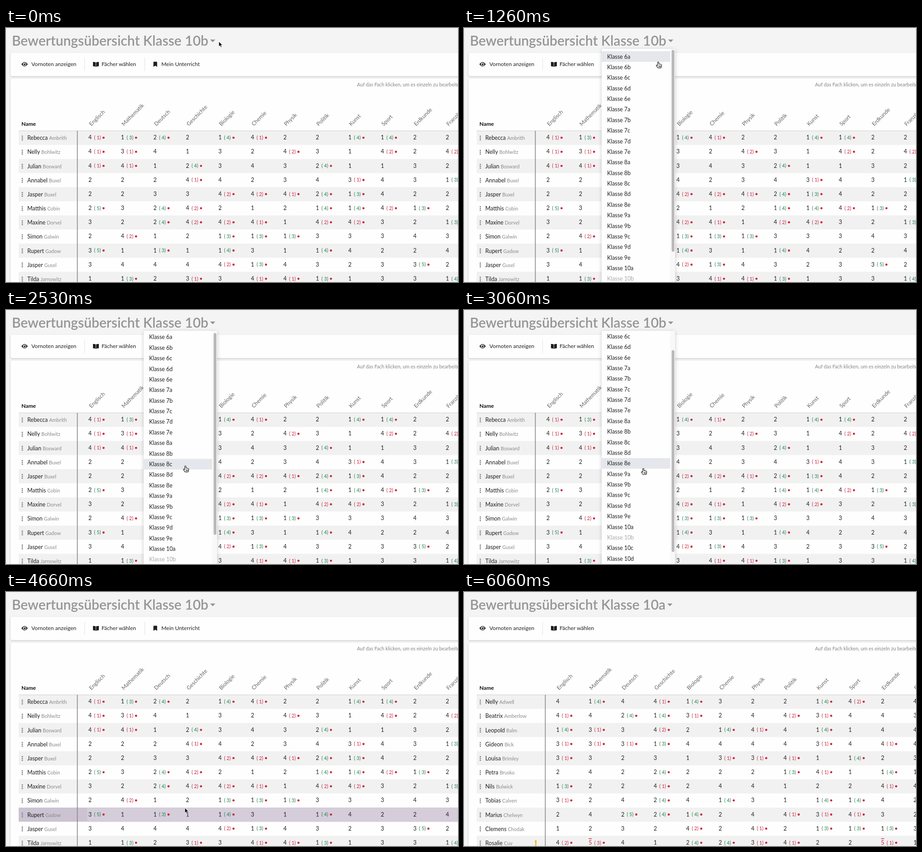
Write an HTML page that moves like this. It is 998 by 561 pixels and loops after 6.13 s.

```html
<!DOCTYPE html>
<html lang="de">
<head>
<meta charset="utf-8">
<title>Bewertungsübersicht</title>
<style>
  html, body { margin: 0; width: 100%; height: 100%; overflow: hidden; background: #f4f4f4; }
  svg { display: block; width: 998px; height: 561px; font: 12.4px Lato, "Open Sans", sans-serif; fill: #1f1f1f; cursor: default; }
  text { white-space: pre; }
  .card { fill: #fefefe; filter: drop-shadow(0 1px 1.5px rgba(0, 0, 0, .22)); }
  .title { font-size: 30px; font-weight: 600; fill: #959595; }
  .tool { font-size: 12.1px; }
  .sep { fill: #e2e2e2; }
  .hint { font-size: 10.8px; fill: #858585; }
  .bold { font-size: 12.2px; font-weight: 700; fill: #111; }
  .subject { font-size: 12.1px; fill: #666; }
  .stripe { fill: #f1f1f1; }
  .rule { fill: #cfcfcf; }
  .divider { fill: #868686; }
  .grip { fill: #858585; }
  .last { font-size: 10.9px; fill: #8a8a8a; }
  .prior { font-size: 10.8px; }
  .up { fill: #1b7d4a; }
  .down { fill: #c5213b; }
  .dot { fill: #d0243f; }
  .warn { fill: #f2b01e; }
  .hover { fill: #cbc3d1; }
  .hover-cells { fill: #d5cdda; }
  .panel { fill: #fefefe; filter: drop-shadow(0 2px 4px rgba(0, 0, 0, .2)); }
  .active { fill: #e5e7ec; }
  .off { fill: #a9a9a9; }
  .track { fill: #f8f8f9; }
  .thumb { fill: #bab7b8; }
</style>
</head>
<body>
<svg id="stage" viewBox="0 0 998 561">
  <defs>
    <clipPath id="listClip"><rect x="304" y="46" width="162" height="530" rx="3"/></clipPath>
  </defs>
  <text id="title" class="title" x="13" y="38.5"></text>
  <path id="caret" fill="#8f8f8f" d="M0 25.5H11.5L5.75 31.3Z"/>

  <rect class="card" x="10" y="54.5" width="1000" height="52" rx="4"/>
  <path d="M34 80Q41 70.5 48 80Q41 89.5 34 80Z"/>
  <circle cx="41" cy="80" r="3.5" fill="#fefefe"/>
  <circle cx="41" cy="80" r="2.3"/>
  <circle cx="40" cy="79" r=".9" fill="#fefefe"/>
  <text class="tool" x="56" y="84.3">Vornoten anzeigen</text>
  <rect class="sep" x="173" y="66" width="1" height="29"/>
  <path d="M192 75Q196 74.6 198.1 76V86Q196 84.6 192 84.6ZM205 75Q201 74.6 198.9 76V86Q201 84.6 205 84.6Z"/>
  <text class="tool" x="211" y="84.3">Fächer wählen</text>
  <g id="lessons">
    <rect class="sep" x="306" y="66" width="1" height="29"/>
    <path d="M325.5 75.5Q325.5 74.4 326.6 74.4H332.6Q333.7 74.4 333.7 75.5V85.8L329.6 83.2L325.5 85.8Z"/>
    <text class="tool" x="343" y="84.3">Mein Unterricht</text>
  </g>

  <rect class="card" x="10" y="112" width="1000" height="470" rx="4"/>
  <text class="hint" x="775" y="129">Auf das Fach klicken, um es einzeln zu bearbeiten</text>
  <text class="bold" x="34" y="216.3">Name</text>
  <g id="tables"></g>

  <g id="menu">
    <rect class="panel" x="304" y="46" width="162" height="530" rx="3"/>
    <g clip-path="url(#listClip)">
      <g id="list"><rect id="active" class="active" x="304" width="151" height="23.4"/></g>
      <rect class="track" x="455" y="46" width="11" height="530"/>
      <rect id="thumb" class="thumb" x="458.5" y="48.5" width="6" height="445.5" rx="3"/>
    </g>
  </g>

  <g id="cursor">
    <path id="arrow" fill="#000" stroke="#fff" stroke-width=".8" d="M0 0V11L2.6 8.6L4.4 12.6L6.3 11.8L4.5 7.9H8Z"/>
    <path id="hand" fill="#fff" stroke="#111" stroke-width="1.1" stroke-linejoin="round"
      d="M-1.3 1.2Q0-.8 1.3 1.2V5.2Q2.6 4.2 3.7 5.5Q5 4.8 5.9 6Q7.4 5.8 7.4 7.5V10Q7 12 6 13.6H-.8Q-2.5 11-4.4 8.6Q-4.4 6.8-2.7 7.4L-1.3 8.6ZM1.6 8.5V11.5M3.4 8.5V11.5M5.2 8.5V11.5"/>
  </g>
</svg>
<script>
const LOOP = 6130, OPEN = 662, CLOSE = 4300, SWAP = 4934;
const ROW_TOP = 227, ROW_H = 31.15, COL_W = 71.73;
const ITEM_TOP = 51.3, ITEM_H = 23.38;
const subjects = 'Englisch Mathematik Deutsch Geschichte Biologie Chemie Physik Politik Kunst Sport Erdkunde Französisch'.split(' ');

// Each row: first name, last name, then grades; a second digit is the prior grade.
const classB = `Rebecca Ambrith 41 13 24 2 14 41 2 2 14 14 2 2
Nelly Bohlwitz 41 31 4 1 3 2 42 3 1 42 2 42
Julian Bosward 41 41 1 24 3 4 3 24 1 1 3 2
Annabel Buxel 2 2 2 41 4 2 3 4 31 4 3 13
Jasper Buxel 2 2 3 3 42 42 41 24 13 4 2 2
Matthis Cobin 25 3 24 42 2 1 2 14 14 42 13 2
Maxine Dorvel 3 2 24 42 42 41 1 42 42 3 2 13
Simon Galwin 2 42 1 2 13 13 13 3 3 3 4 3
Rupert Gadow 35 1 13 1 14 3 1 14 4 2 2 4
Jasper Gusel 3 4 4 4 42 13 4 3 2 3 35 2
Tilda Jarnowitz 1 13 2 31 3 41 41 13 1 3 3 14`;
const classA = `Nelly Adwell 4 14 4 41 14 3 2 2 14 42 2 41
Beatrix Amberlow 41 4 24 14 31 2 4 42 31 4 4 31
Leopold Balm 14 31 3 42 2 14 41 4 14 1 4 42
Gideon Bick 31 31 31 13 4 4 4 4 31 4 41 41
Louisa Brimley 31 3 2 3 1 31 31 41 1 14 2 3
Petra Brusko 2 4 2 24 2 2 2 13 41 1 14 14
Nils Bulwick 13 2 2 41 2 4 4 1 2 2 41 4
Tobias Calven 31 2 4 24 4 14 3 1 14 14 4 2
Marius Chelwyn 2 4 25 24 14 2 4 41 31 41 3 24
Clemens Chodak 1 2 3 2 42 2 41 2 13 13 13 31
Rosalie Cuv 42 53 4 1 24 24 31 41 2 2 51 1`;

const $ = id => document.getElementById(id);

function add(parent, tag, attrs = {}, text) {
  const node = document.createElementNS('http://www.w3.org/2000/svg', tag);
  for (const key in attrs) node.setAttribute(key, attrs[key]);
  if (text !== undefined) node.textContent = text;
  parent.append(node);
  return node;
}
const rect = (parent, cls, x, y, width, height) =>
  add(parent, 'rect', { class: cls, x, y, width, height });
const label = (parent, cls, x, y, text) => add(parent, 'text', { class: cls, x, y }, text);
const dot = (parent, cls, cx, cy, r) => add(parent, 'circle', { class: cls, cx, cy, r });
const show = (node, on) => node.setAttribute('visibility', on ? 'inherit' : 'hidden');

function addGrade(parent, x, mid, code) {
  const [grade, prior] = code;
  const failing = grade === '5';
  label(parent, failing ? 'down' : '', x, mid + 4.3, grade);
  if (failing) rect(parent, 'down', x, mid - 9.5, 7, 1.3);
  if (!prior) return;
  label(parent, 'prior ' + (prior > grade ? 'up' : 'down'), x + 12.5, mid + 4, `( ${prior})`);
  dot(parent, 'dot', x + 33.4, mid + .3, 2.4);
}

function addTable(id, data, divider, x0) {
  const root = add($('tables'), 'g');
  const rows = data.split('\n').map(line => line.split(' '));
  const clip = add(root, 'clipPath', { id });
  rect(clip, '', divider, 112, 998, 449);

  rows.forEach((_, i) => {
    if (i % 2 === 0) rect(root, 'stripe', 28, ROW_TOP + i * ROW_H, 970, ROW_H);
  });
  const hover = rect(root, 'hover', 28, 0, 970, ROW_H);
  const cells = add(add(root, 'g', { 'clip-path': `url(#${id})` }), 'g');
  const hoverCells = rect(cells, 'hover-cells', x0 - 2.5, 0, 998, ROW_H);

  subjects.forEach((name, c) => {
    const x = x0 + c * COL_W + 6.5;
    add(cells, 'text', { class: 'subject', transform: `translate(${x} 217) rotate(-45)` }, name);
  });
  rows.forEach(([first, last, ...grades], i) => {
    const mid = 242 + i * ROW_H;
    for (const dy of [-4, 0, 4]) dot(root, 'grip', 36, mid + 1 + dy, 1.5);
    const name = label(root, '', 47, mid + 5.3, first);
    add(name, 'tspan', { class: 'last', dx: 3 }, last);
    grades.forEach((code, c) => addGrade(cells, x0 + c * COL_W, mid, code));
    if (grades.some(code => code[0] === '5')) {
      add(root, 'path', { class: 'warn', d: `M156.6 ${mid - 5}h3.8l-.7 8h-2.4z` });
      dot(root, 'warn', 158.5, mid + 5.6, 1.8);
    }
  });
  rect(root, 'rule', 28, 226.6, 970, 1);
  rect(root, 'divider', divider - .8, 227, 1.6, 340);
  return { root, cells, hover, hoverCells };
}

const tableB = addTable('cellsB', classB, 157.5, 182);
const tableA = addTable('cellsA', classA, 179.5, 203.5);

for (let i = 0; i < 25; i++) {
  const name = 6 + Math.floor(i / 5) + 'abcde'[i % 5];
  label($('list'), name === '10b' ? 'off' : '', 316, ITEM_TOP + i * ITEM_H + 16.2, 'Klasse ' + name);
}

const clamp = v => Math.min(1, Math.max(0, v));
const easeOut = p => 1 - (1 - p) ** 2;
const smooth = p => p * p * (3 - 2 * p);

// Eased position between timed points [time, ...values].
function follow(points, t) {
  const next = points.findIndex(p => p[0] > t);
  if (next < 0) return points.at(-1).slice(1);
  const a = points[next - 1] || points[0], b = points[next];
  const p = smooth(clamp((t - a[0]) / (b[0] - a[0] || 1)));
  return a.slice(1).map((v, i) => v + (b[i + 1] - v) * p);
}

const pointer = [
  [0, 470, 30], [250, 470, 30], [560, 436, 29], [950, 436, 29], [1830, 411, 188],
  [2450, 396, 344], [2950, 396, 344], [3730, 395, 451], [4020, 395, 477],
  [5350, 395, 477], [5850, 400, 600]
];
const scrolling = [[0, 0], [2454, 0], [2974, 51.5]];

function drawMenu(t, y) {
  const opened = clamp((t - OPEN) / 120);
  const closed = clamp((t - CLOSE) / 100);
  const [scroll] = follow(scrolling, t);
  const scale = .95 + .05 * easeOut(opened) - .05 * closed;
  const index = y < ITEM_TOP ? 3 : Math.floor((y - ITEM_TOP + scroll) / ITEM_H);
  const menu = $('menu');
  show(menu, t >= OPEN && closed < 1);
  menu.setAttribute('opacity', Math.min(1, opened * 2) * (1 - closed));
  menu.setAttribute('transform', `translate(304 46) scale(${scale}) translate(-304 -46)`);
  $('list').setAttribute('transform', `translate(0 ${-scroll})`);
  $('active').setAttribute('y', ITEM_TOP + index * ITEM_H);
  $('thumb').setAttribute('y', 48.5 + scroll * .78);
}

function drawTable(t, y, hovering) {
  const swapped = t >= SWAP;
  const table = swapped ? tableA : tableB;
  show(tableB.root, !swapped);
  show(tableA.root, swapped);
  show($('lessons'), !swapped);

  const name = 'Bewertungsübersicht Klasse 10' + (swapped ? 'a' : 'b');
  if ($('title').textContent !== name) {
    $('title').textContent = name;
    $('caret').setAttribute('transform', `translate(${17 + $('title').getComputedTextLength()} 0)`);
  }

  const entered = easeOut(clamp((t - SWAP) / 400));
  tableA.cells.setAttribute('transform', `translate(${-60 * (1 - entered)} 0)`);
  tableA.cells.setAttribute('opacity', entered);

  const row = Math.floor((y - ROW_TOP) / ROW_H);
  for (const bar of [table.hover, table.hoverCells]) {
    show(bar, hovering && row >= 0 && row < 11);
    bar.setAttribute('y', ROW_TOP + row * ROW_H);
  }
}

function draw(t) {
  const [x, y] = follow(pointer, t);
  const menuOpen = t >= OPEN && t < CLOSE;
  const pointing = menuOpen || (x < 466 && y < 46);
  drawMenu(t, y);
  drawTable(t, y, !menuOpen);
  $('cursor').setAttribute('transform', `translate(${x} ${y})`);
  show($('hand'), pointing);
  show($('arrow'), !pointing);
}

const start = performance.now();
function tick() {
  draw((performance.now() - start) % LOOP);
  requestAnimationFrame(tick);
}
tick();
</script>
</body>
</html>
```
